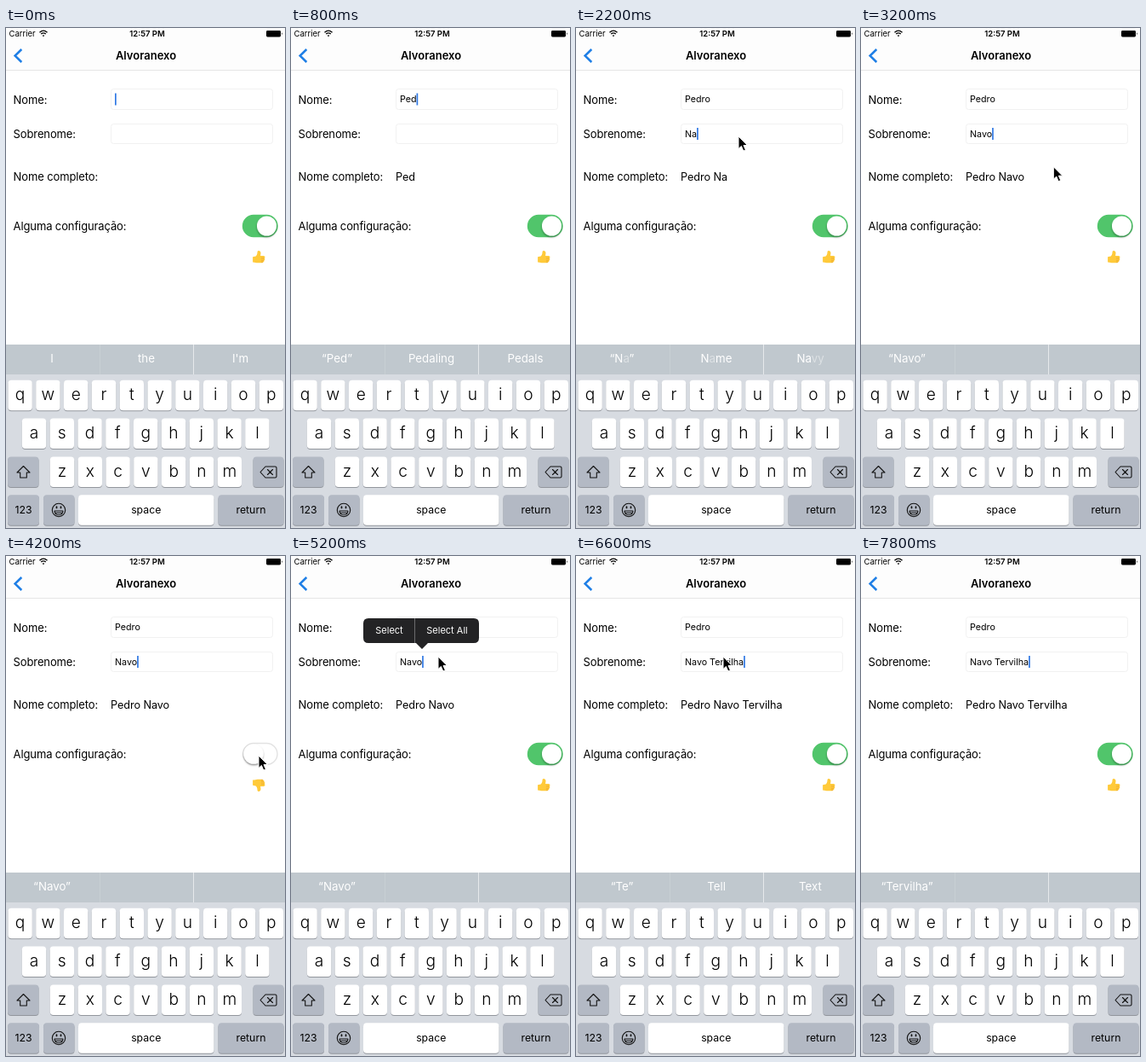
Recreate the animation shown at these times as an HTML page. Size 328x586 px, loop 8 s.

```html
<!DOCTYPE html>
<html lang="pt">
<head>
<meta charset="utf-8">
<title>Formulário</title>
<style>
  html, body { margin: 0; width: 100%; height: 100%; overflow: hidden; background: #fff; }
  svg { display: block; width: 100vw; height: 100vh; }
  text { font-family: Inter, Roboto, sans-serif; white-space: pre; fill: #000; }
  .label { font-size: 13px; letter-spacing: -.12px; }
  .full { font-size: 12.7px; letter-spacing: -.08px; }
  .input { font-size: 10.7px; }
  .mid { text-anchor: middle; }
  .key { font-size: 19.2px; font-weight: 300; }
  .word { font-size: 12.3px; }
  .hint { font-size: 13.3px; fill: #fff; }
  .menu { font-size: 11px; fill: #fff; }
  .line { fill: none; stroke: #111; stroke-width: 1.1; stroke-linejoin: round; stroke-linecap: round; }
</style>
</head>
<body>
<svg viewBox="0 0 328 586" xmlns="http://www.w3.org/2000/svg">
  <defs>
    <filter id="soft" x="-30%" y="-30%" width="160%" height="180%">
      <feDropShadow dx="0" dy="1.5" stdDeviation="1.2" flood-opacity=".38"/>
    </filter>
  </defs>
  <rect width="328" height="586" fill="#fff"/>
  <rect width="328" height="49" fill="#fdfdfd"/>
  <path d="M0 49.5H328" stroke="#e6e6e6"/>

  <text x="3.5" y="10" font-size="9.5">Carrier</text>
  <g fill="none" stroke="#000" stroke-width="1.3">
    <path d="M39.5 5.2Q44 1 48.5 5.2M41.2 7.1Q44 4.6 46.8 7.1"/>
    <path d="M44 10.3L42.7 8.8Q44 7.6 45.3 8.8Z" fill="#000" stroke="none"/>
  </g>
  <text class="mid" x="166" y="10" font-size="9.5" font-weight="600">12:57 PM</text>
  <rect x="306" y="3" width="17" height="7.5" rx="1.4"/>
  <path d="M324 5.3q1.6 1.4 0 2.8z"/>
  <path d="M18.3 25L10.6 32.5L18.3 40" fill="none" stroke="#1f7fe6" stroke-width="2.5"/>
  <text class="mid" x="164.5" y="37" font-size="13" font-weight="600">Alvoranexo</text>

  <text class="label" x="8.6" y="88.5">Nome:</text>
  <text class="label" x="8.6" y="129">Sobrenome:</text>
  <text class="label" x="8.6" y="179">Nome completo:</text>
  <text class="label" x="8.6" y="236.5">Alguma configuração:</text>
  <g fill="#fff" stroke="#f1f1f1">
    <rect x="123.5" y="71.5" width="190" height="24" rx="3"/>
    <rect x="123.5" y="112.5" width="190" height="23" rx="3"/>
  </g>
  <text id="first" class="input" x="128" y="87.2"></text>
  <text id="last" class="input" x="128" y="128"></text>
  <text id="full" class="full" x="123" y="179"></text>
  <rect id="caret" width="1.7" height="14" fill="#2f78e4"/>

  <rect id="track" x="278.5" y="219.5" width="40.5" height="25" rx="12.5" stroke-width="1.4"/>
  <rect id="knob" y="220.5" width="23" height="23" rx="11.5" fill="#fff" filter="url(#soft)"/>
  <g id="thumb">
    <path d="M-7.2 -.3L-3.6 -1C-2 -2.5-1.8 -4.5-1.7 -6.5C-1 -8.2 2.3 -7.6 2.2 -4.6L1.8 -1.4H5.6C7.5 -1.3 7.6 .8 6.5 1.2C7.6 2 7.2 3.4 6.1 3.7C6.6 4.7 6 5.6 5 5.7C4.8 6.5 4.2 6.8 3.4 6.8H-1.5C-3.5 6.7-4.2 6-7.2 5.9Z" fill="#ffca3a"/>
    <path d="M2.6 1.3H6.2M2.6 3.7H6M2.6 5.7H5" fill="none" stroke="#e5a02c" stroke-width=".7"/>
  </g>

  <rect y="371" width="328" height="215" fill="#d7dbe1"/>
  <rect y="371" width="328" height="35" fill="#c0c8ce"/>
  <path d="M110.5 371V406" stroke="#c8cfd4"/>
  <path d="M220.5 371V406" stroke="#e6e9eb"/>
  <g id="hints"></g>
  <g id="keys"></g>
  <path class="line" d="M20.5 513.5L28 521H24.3V527H16.7V521H13Z"/>
  <path class="line" d="M305 514H316.5Q318 514 318 515.5V525.5Q318 527 316.5 527H305L299 520.5ZM307.5 517.5L313.5 523.5M313.5 517.5L307.5 523.5"/>
  <circle class="line" cx="62" cy="565" r="7.7"/>
  <path class="line" d="M57 566H67Q66.5 570.7 62 570.7T57 566ZM57.8 568.3H66.2"/>
  <path d="M59.5 561V562.4M64.5 561V562.4" stroke="#111" stroke-width="1.7" stroke-linecap="round"/>

  <g id="menu">
    <path d="M91 73H215Q221 73 221 79V96Q221 102 215 102H161L154 109L147 102H91Q85 102 85 96V79Q85 73 91 73Z" fill="#232325"/>
    <path d="M145.5 73V102" stroke="#6b6b6d"/>
    <text class="menu mid" x="115.5" y="91">Select</text>
    <text class="menu mid" x="183.5" y="91">Select All</text>
  </g>
  <path id="pointer" d="M0 0V14.5L3.4 11.4L5.8 17L8.4 15.9L6 10.5H10.5Z" stroke="#fff" stroke-width="1"/>
</svg>
<script>
const LOOP = 8000, STEP = 200;
const $ = id => document.getElementById(id);
const set = (id, attrs) => Object.entries(attrs).forEach(([k, v]) => $(id).setAttribute(k, v));
const show = (id, on) => $(id).style.display = on ? '' : 'none';

// Each entry holds from its time until the next one.
const FIRST = [[0, ''], [400, 'P'], [600, 'Pe'], [800, 'Ped'], [1000, 'Pedr'], [1200, 'Pedro']];
const LAST = [[0, ''], [2000, 'N'], [2200, 'Na'], [2400, 'Nav'], [2600, 'Navo'],
  [5600, 'Navo '], [5800, 'Navo T'], [6000, 'Navo Te'], [6200, 'Navo Terv'],
  [6400, 'Navo Tervil'], [6600, 'Navo Tervilha']];
// Braces mark letters that are still fading in.
const HINTS = [[0, "I|the|I'm"], [400, '“P”|People|Put'], [800, '“Ped”|Pedaling|Pedals'],
  [1200, '“Pedro”||'], [1800, "I|the|I'm"], [2000, '“N”|Not|Now'], [2200, '“N{a}”|N{a}me|Na{vy}'],
  [2400, '“Na”|Name|Navy'], [2800, '“Navo”||'], [5600, "I|the|I'm"], [6000, '“T”|The|That'],
  [6200, '“Te”|Tell|Text'], [6800, '“Tervilha”||']];
const POINTER = [[1600, 316, 165], [1800, 191, 127], [3000, 191, 127], [3600, 297, 234],
  [4600, 297, 234], [5000, 173, 118], [6800, 173, 118], [7000, 190, 462]];

const at = (list, t) => list.filter(e => e[0] <= t).pop()[1];

function pointerAt(t) {
  const i = POINTER.findIndex(p => p[0] > t);
  if (i < 1) return t === POINTER.at(-1)[0] ? POINTER.at(-1).slice(1) : null;
  const [a, b] = [POINTER[i - 1], POINTER[i]];
  const u = (t - a[0]) / (b[0] - a[0]);
  return [1, 2].map(k => a[k] + (b[k] - a[k]) * u);
}

function key(x, y, w, label = '', dark = false, cls = 'key') {
  const box = (dy, fill) => `<rect x="${x}" y="${y + dy}" width="${w}" height="35.5" rx="4" fill="${fill}"/>`;
  return box(1, '#92969d') + box(0, dark ? '#b3b9c4' : '#fff') +
    `<text class="${cls} mid" x="${x + w / 2}" y="${y + (cls === 'key' ? 23.2 : 21.5)}">${label}</text>`;
}

function buildKeys() {
  const rows = [['qwertyuiop', 16.6], ['asdfghjkl', 33], ['zxcvbnm', 66]];
  const letters = rows.map(([chars, x0], r) =>
    [...chars].map((c, i) => key(x0 + 32.8 * i - 14.2, 412.8 + 44.8 * r, 28.4, c)).join('')).join('');
  $('keys').innerHTML = letters +
    key(2, 502.4, 36.5, '', true) + key(290.5, 502.4, 36, '', true) +
    key(2, 547.2, 37, '123', true, 'word') + key(44, 547.2, 36.5, '', true) +
    key(85, 547.2, 159.5, 'space', false, 'word') + key(249.5, 547.2, 77, 'return', true, 'word');
  $('hints').innerHTML = [54, 165, 275.5].map(x => `<text class="hint mid" x="${x}" y="392"></text>`).join('');
}

function render(t) {
  const first = at(FIRST, t), last = at(LAST, t);
  $('first').textContent = first;
  $('last').textContent = last;
  $('full').textContent = `${first} ${last}`.trim();
  at(HINTS, t).split('|').forEach((word, i) => {
    $('hints').children[i].innerHTML =
      word.replace(/{(.*?)}/, '<tspan fill-opacity=".45">$1</tspan>');
  });

  const inLast = t >= 1800, field = $(inLast ? 'last' : 'first');
  const typing = [[400, 1200], [2000, 2600], [5600, 6600]].some(([a, b]) => t >= a && t <= b);
  const blink = t % 1000;
  show('caret', typing || blink < 400 || blink > 600);
  set('caret', {
    x: 128 + (field.textContent ? field.getComputedTextLength() : 0),
    y: inLast ? 117 : 76.5
  });

  const on = t < 3800 || t >= 4600;
  set('track', { fill: on ? '#51c56b' : '#fff', stroke: on ? '#51c56b' : '#e2e2e2' });
  set('knob', { x: on ? 295 : 279.5 });
  set('thumb', { transform: `translate(297.3 268.5) scale(1 ${on ? 1 : -1})` });

  show('menu', t >= 5200 && t < 5600);
  const p = pointerAt(t);
  show('pointer', p);
  if (p) set('pointer', { transform: `translate(${p[0]} ${p[1]})` });
}

buildKeys();
const start = performance.now();
let shown = -1;
function tick() {
  const elapsed = (performance.now() - start) % LOOP;
  const t = Math.floor(elapsed / STEP) * STEP;
  if (t !== shown) render(shown = t);
  requestAnimationFrame(tick);
}
tick();
</script>
</body>
</html>
```
